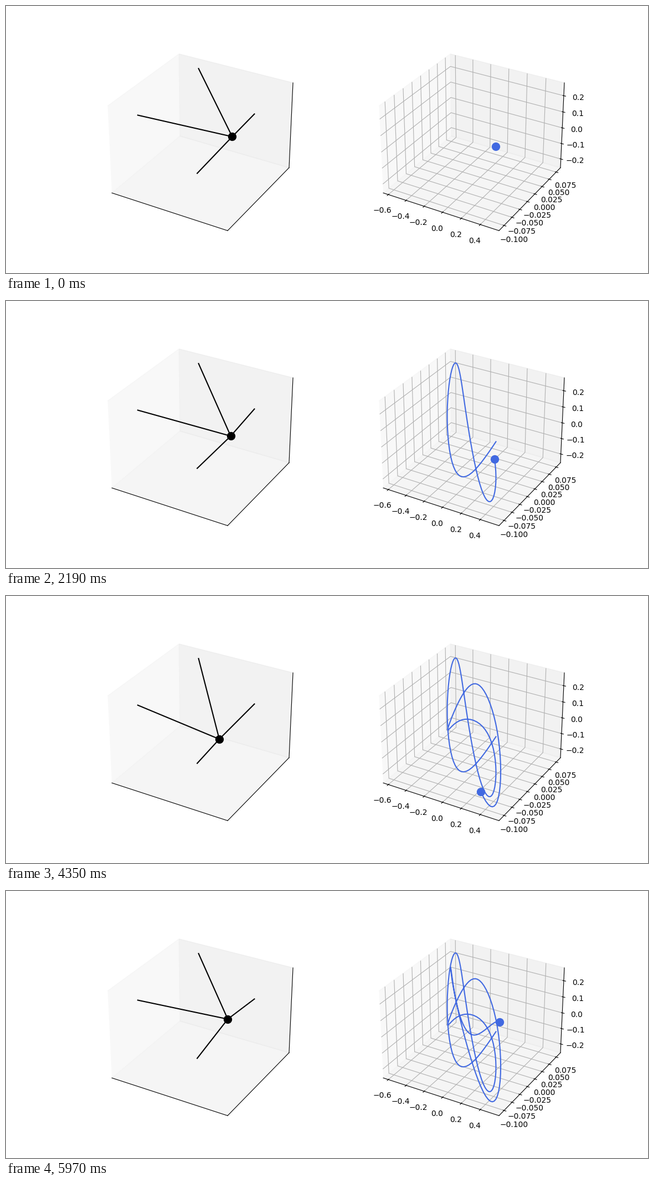
A matplotlib script that plays this animation: 1159x483 px, repeating every 6000 ms.

```python
import numpy as np
import matplotlib.pyplot as plt
from matplotlib.animation import FuncAnimation

FRAMES, INTERVAL = 200, 30
DURATION = 20.0      # simulated time of one loop
SUBSTEPS = 10
REST = 1.0           # rest length of each spring (k = m = 1)

# Three anchors on a ring above the origin, one straight below it
h = np.sqrt(0.5)
turns = np.radians([0, 120, 240])
anchors = np.array([[h * np.cos(a), h * np.sin(a), h] for a in turns]
                   + [[0.0, 0.0, -1.0]])


def deriv(state):
    gap = anchors - state[:3]
    length = np.sqrt((gap ** 2).sum(axis=1))
    force = ((1 - REST / length)[:, None] * gap).sum(axis=0)
    return np.concatenate([state[3:], force])


def rk4(state, dt):
    k1 = deriv(state)
    k2 = deriv(state + dt / 2 * k1)
    k3 = deriv(state + dt / 2 * k2)
    k4 = deriv(state + dt * k3)
    return state + dt / 6 * (k1 + 2 * k2 + 2 * k3 + k4)


def simulate():
    dt = DURATION / (FRAMES - 1) / SUBSTEPS
    state = np.array([0.5, -0.1, 0.2, 0.0, 0.0, 0.0])
    path = [state[:3]]
    for _ in range(FRAMES - 1):
        for _ in range(SUBSTEPS):
            state = rk4(state, dt)
        path.append(state[:3])
    return np.array(path)


def make_axes(pos, xlim, ylim, zlim):
    ax = fig.add_subplot(pos, projection="3d")
    ax.set_xlim(*xlim)
    ax.set_ylim(*ylim)
    ax.set_zlim(*zlim)
    return ax


path = simulate()

fig = plt.figure(figsize=(11.59, 4.83), dpi=100)
left = make_axes(121, (-0.6717, 0.8008), (-0.7017, 0.7017), (-1.1245, 0.8316))
right = make_axes(122, (-0.6576, 0.5934), (-0.1157, 0.0907), (-0.2570, 0.2784))
left.set_xticks([])
left.set_yticks([])
left.set_zticks([])

springs = [left.plot([], [], [], color="black", lw=1.5)[0] for _ in anchors]
mass, = left.plot([], [], [], "o", color="black", ms=10)
trail, = right.plot([], [], [], color="royalblue", lw=1.5)
dot, = right.plot([], [], [], "o", color="royalblue", ms=10)


def update(i):
    for line, anchor in zip(springs, anchors):
        line.set_data_3d(*np.array([anchor, path[i]]).T)
    mass.set_data_3d(*path[i:i + 1].T)
    trail.set_data_3d(*path[:i + 1].T)
    dot.set_data_3d(*path[i:i + 1].T)
    return [*springs, mass, trail, dot]


def init():
    return update(0)


anim = FuncAnimation(fig, update, frames=FRAMES, init_func=init,
                     interval=INTERVAL, repeat=True, repeat_delay=0)
plt.show()
```
